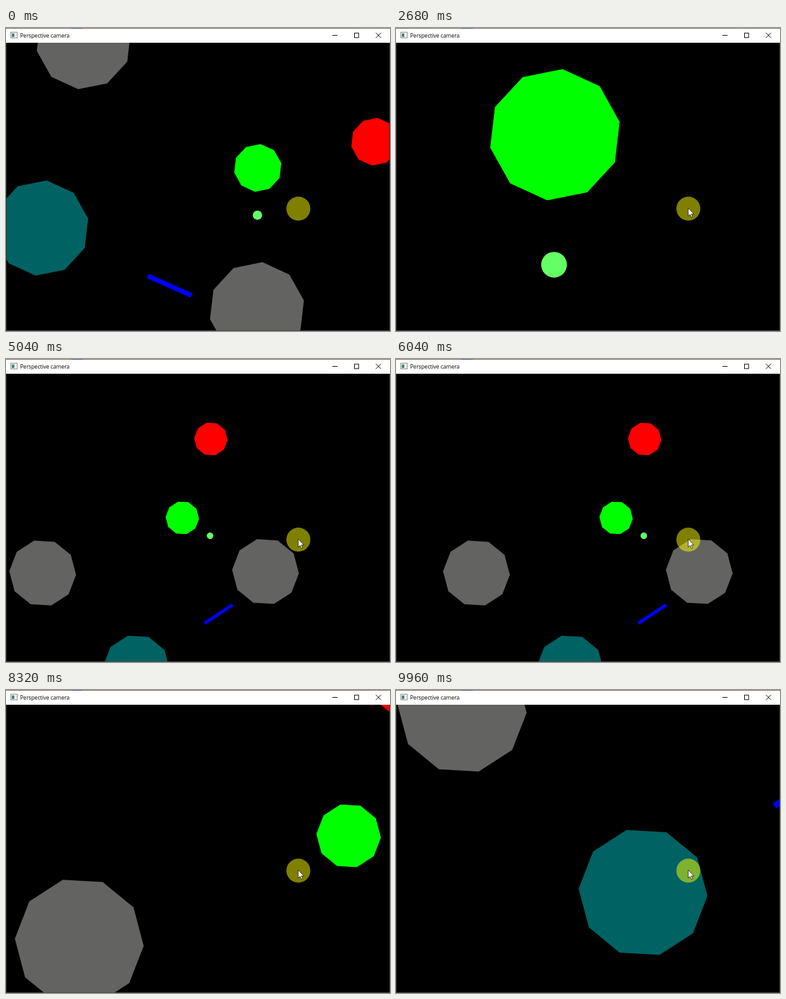
Recreate the animation shown at these times as an HTML page. Size 600 by 473 pixels, loop 10 s.

```html
<!DOCTYPE html>
<html lang="en">
<head>
<meta charset="utf-8">
<title>Perspective camera</title>
<style>
  html, body { margin: 0; width: 100%; height: 100%; overflow: hidden; background: #000; }
  svg { display: block; width: 600px; height: 473px; }
  text { font: 8.5px "Open Sans", "Noto Sans", sans-serif; }
</style>
</head>
<body>
<svg viewBox="0 0 600 473">
  <defs><clipPath id="view"><rect x="1" y="23" width="598.5" height="449"/></clipPath></defs>
  <rect width="600" height="473"/>
  <g clip-path="url(#view)"><g id="world"></g></g>

  <rect width="600" height="23" fill="#fff"/>
  <path d="M0 .5H600" stroke="#7d6a52"/>
  <path d="M102 .5H120" stroke="#3c4a78"/>
  <path d="M.5 23V473M599.5 23V473" stroke="#37312c"/>
  <path d="M0 472.5H600" stroke="#4f4840"/>
  <rect x="7.5" y="6.5" width="10" height="9" fill="#f4f4f4" stroke="#8c8c8c"/>
  <rect x="9" y="8.5" width="4" height="5.5" fill="#4a8078"/>
  <text x="22" y="15" fill="#000">Perspective camera</text>
  <g fill="none" stroke="#000">
    <path d="M510 11.5H518"/>
    <rect x="544.5" y="8" width="6.5" height="7"/>
    <path d="M578 7.5L586 15.5M586 7.5L578 15.5"/>
  </g>

  <circle cx="456.8" cy="282" r="18.7" fill="#ff0" fill-opacity=".5"/>
  <path id="arrow" d="M456.6 281V293.6L459.5 291L461.6 295.6L463.5 294.7L461.5 290.3H465.4Z"
        fill="#fff" stroke="#000" stroke-width=".7"/>
</svg>
<script>
const LOOP = 10000, TICK = 40;
const START_DEPTH = 22;
const world = document.getElementById('world');
const arrow = document.getElementById('arrow');

function add(tag, attrs) {
  const el = document.createElementNS('http://www.w3.org/2000/svg', tag);
  for (const key in attrs) el.setAttribute(key, attrs[key]);
  world.append(el);
}

function decagon(cx, cy, r, fill) {
  const points = Array.from({ length: 10 }, (_, i) => {
    const a = (i * 36 - 11.3) * Math.PI / 180;
    return (cx + r * Math.cos(a)).toFixed(2) + ',' + (cy + r * Math.sin(a)).toFixed(2);
  });
  add('polygon', { points: points.join(' '), fill });
}

decagon(-178.5, -226.8, 74.8, '#636461');
decagon(92.1, 191.9, 74.8, '#636461');
decagon(-245, 64.2, 74.8, '#006262');
decagon(276.3, -70.4, 37.5, '#f00');
decagon(93.4, -29.6, 37.5, '#0f0');
add('circle', { cx: 92.9, cy: 44.2, r: 7.3, fill: '#64ff64' });
add('line', { x1: -78.7, y1: 139, x2: -10, y2: 169.7, stroke: '#00f', 'stroke-width': 7.3 });

// Camera moves: first step, last step, number of steps, property, value reached
const moves = [
  [40, 360, 4, 'slide', -40.8],
  [520, 1040, 7, 'slide', -112.2],
  [1680, 2680, 14, 'depth', 8],
  [2800, 2960, 3, 'depth', 12],
  [3280, 3680, 6, 'depth', 21],
  [3760, 4280, 8, 'depth', 31.5],
  [4280, 4280, 1, 'turn', -6],
  [4600, 5040, 7, 'turn', -57.5],
  [5160, 5160, 1, 'turn', -61.5],
  [5280, 5280, 1, 'turn', -57.5],
  [5600, 6600, 15, 'x', 209.8],
  [6680, 6800, 3, 'depth', 29.4],
  [7160, 7680, 8, 'depth', 22],
  [7840, 8240, 6, 'depth', 16.33],
  [8320, 8320, 1, 'y', -15.1],
  [8400, 8840, 6, 'y', -96],
  [8920, 9880, 14, 'y', -285.3],
  [8920, 9880, 14, 'x', 201.6]
];

function camera(t) {
  const cam = { slide: 0, depth: START_DEPTH, turn: 0, x: 0, y: 0 };
  for (const [from, to, steps, key, goal] of moves) {
    if (t < from) continue;
    const done = t >= to ? steps : 1 + Math.floor((t - from) / (to - from) * (steps - 1) + 1e-6);
    cam[key] += (goal - cam[key]) * done / steps;
  }
  return cam;
}

function draw(t) {
  const { slide, depth, turn, x, y } = camera(t);
  world.setAttribute('transform',
    `translate(300 248) scale(${START_DEPTH / depth}) translate(${x} ${y}) rotate(${turn}) translate(${slide} 0)`);
  arrow.style.display = t < TICK ? 'none' : '';
}

const begin = performance.now();
function loop() {
  const t = (performance.now() - begin) % LOOP;
  draw(Math.floor(t / TICK) * TICK);
  requestAnimationFrame(loop);
}
loop();
</script>
</body>
</html>
```
